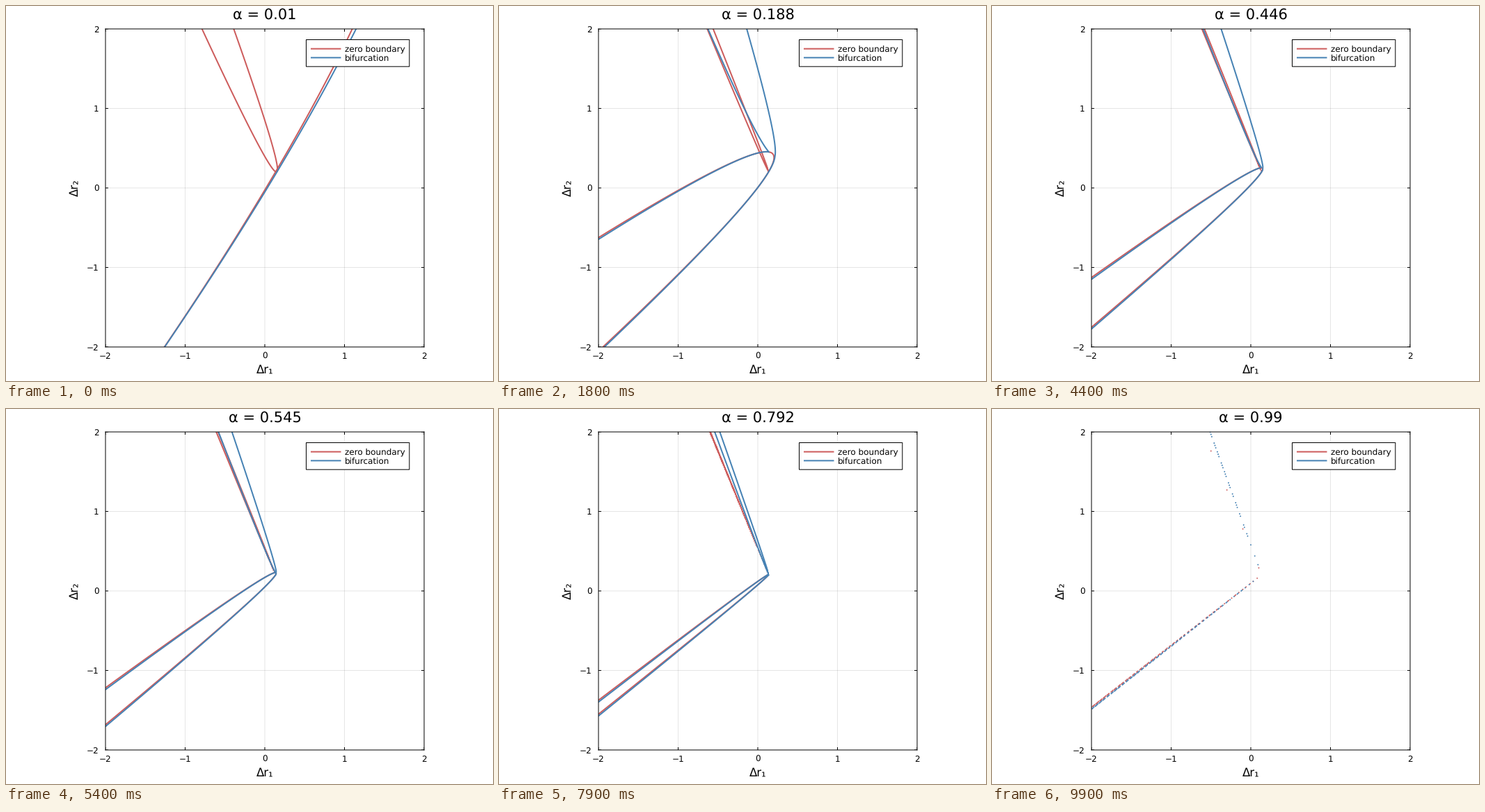
A matplotlib script that plays this animation: 700 px wide and 540 px high, repeating every 10000 ms.

```python
import numpy as np
import matplotlib.pyplot as plt
from matplotlib.animation import FuncAnimation
from matplotlib.collections import LineCollection
from matplotlib.lines import Line2D
from matplotlib.patches import Rectangle

W, H, DPI = 700, 540, 100
PX = 72 / DPI  # one pixel in points
RED, BLUE = "indianred", "steelblue"
N = 100
ALPHAS = np.linspace(0.01, 0.99, N)

plt.rcParams.update({"font.family": "DejaVu Sans", "path.simplify": False,
                     "text.hinting": "no_hinting"})

# Steady states: dr = P + (1 - a) (U1 x + U2 y) + a (V1 x^2 + E x y + V2 y^2)
m, n = 0.7805, 20 / 49
P = np.array([-0.1 + n * 0.577, 0.203])
U1 = np.array([0.278, 0.474])
U2 = np.array([0.0199, -0.012])
V1 = np.array([-1, -m])
V2 = np.array([-n, 1])
E = np.array([0.4537, 0.1232])

axis = np.linspace(-2, 2, 401)
GX, GY = np.meshgrid(axis, axis)

# det(l C1 + C2) of the conic pencil, split into a constant and an r-dependent part
mul = np.convolve
e, d1, d2 = E / 2, U1 / 2, U2 / 2
Q = mul(V1, V2) - mul(e, e)
K = 2 * mul(mul(e, d1), d2) - mul(V1, mul(d2, d2)) - mul(V2, mul(d1, d1))


def zero_x(X, Y):
    t = (Y - m * X) / (U1[1] - m * U1[0])
    return X - U1[0] * t + t**2


def zero_y(X, Y):
    t = (X + n * Y) / (U2[0] + n * U2[1])
    return Y - U2[1] * t - t**2


def fold(X, Y):
    """Discriminant of the pencil cubic: vanishes where steady states merge."""
    a = K[0] - X * Q[0]
    b = K[1] - X * Q[1] - Y * Q[0]
    c = K[2] - X * Q[2] - Y * Q[1]
    d = K[3] - Y * Q[2]
    return (b * b * c * c - 4 * a * c**3 - 4 * b**3 * d
            - 27 * a * a * d * d + 18 * a * b * c * d)


fig = plt.figure(figsize=(W / DPI, H / DPI), dpi=DPI, facecolor="white")
L, T, S = 143, 33, 458
ax = fig.add_axes([L / W, 1 - (T + S) / H, S / W, S / H])
ax.set(xlim=(-2, 2), ylim=(-2, 2), xticks=[], yticks=[])
for spine in ax.spines.values():
    spine.set_linewidth(PX)
    spine.set_snap(False)


def rule(xs, ys, **kw):
    ax.add_line(Line2D(xs, ys, color="black", linewidth=PX, snap=False,
                       solid_capstyle="butt", **kw))


def label(x, y, text, size, ha="center", **kw):
    return fig.text(x / W, 1 - y / H, text, fontsize=size * PX, ha=ha,
                    va="baseline", **kw)


def add(artist):
    artist.set_transform(fig.transFigure)
    artist.set_snap(False)
    fig.add_artist(artist)


tick = 4 * 4 / S
for v in range(-2, 3):
    if abs(v) < 2:
        rule([v, v], [-2, 2], alpha=0.1, zorder=1)
        rule([-2, 2], [v, v], alpha=0.1, zorder=1)
    for edge, inner in ((-2, -2 + tick), (2, 2 - tick)):
        rule([v, v], [edge, inner], zorder=2.5)
        rule([edge, inner], [v, v], zorder=2.5)
    name = str(v).replace("-", "\u2212")
    pos = (v + 2) * S / 4
    label(L + pos, 507.8, name, 12)
    label(133.5, T + S - pos + 4.6, name, 12, ha="right")
label(372, 529, "Δr₁", 16.5)
label(103.3, 262, "Δr₂", 16.5, rotation=90, rotation_mode="anchor")
title = label(372, 18.5, "", 21)

add(Rectangle((431.5 / W, 1 - 87.2 / H), 148.3 / W, 38.7 / H, facecolor="white",
              edgecolor="black", linewidth=PX, zorder=5))
for y, color, text in ((61.6, RED, "zero boundary"), (74.4, BLUE, "bifurcation")):
    add(Line2D([438 / W, 481.5 / W], [1 - y / H] * 2, color=color,
               linewidth=2 * PX, solid_capstyle="butt", zorder=6))
    label(487, y + 4.4, text, 12, ha="left", zorder=6)

curves = []
for f, color in ((zero_x, RED), (zero_y, RED), (fold, BLUE)):
    lines = LineCollection([], colors=color, linewidths=2 * PX, capstyle="round",
                           joinstyle="round", snap=False, zorder=2.2)
    ax.add_collection(lines, autolim=False)
    curves.append((f, lines))


def level_set(values):
    """Zero level lines; loops smaller than a pixel shrink to round dots."""
    found = ax.contour(GX, GY, values, levels=[0])
    found.remove()
    return [s[:2] if np.ptp(s, axis=0).max() < 0.005 else s
            for s in found.allsegs[0]]


def update(i):
    a = ALPHAS[i]
    scale = (1 - a) ** 2 / a
    X, Y = (GX - P[0]) / scale, (GY - P[1]) / scale
    for f, lines in curves:
        lines.set_segments(level_set(f(X, Y)))
    title.set_text(f"α = {round(float(a), 3)}")
    return [title]


anim = FuncAnimation(fig, update, frames=N, interval=100, repeat=True,
                     repeat_delay=0, blit=False)
plt.show()
```
